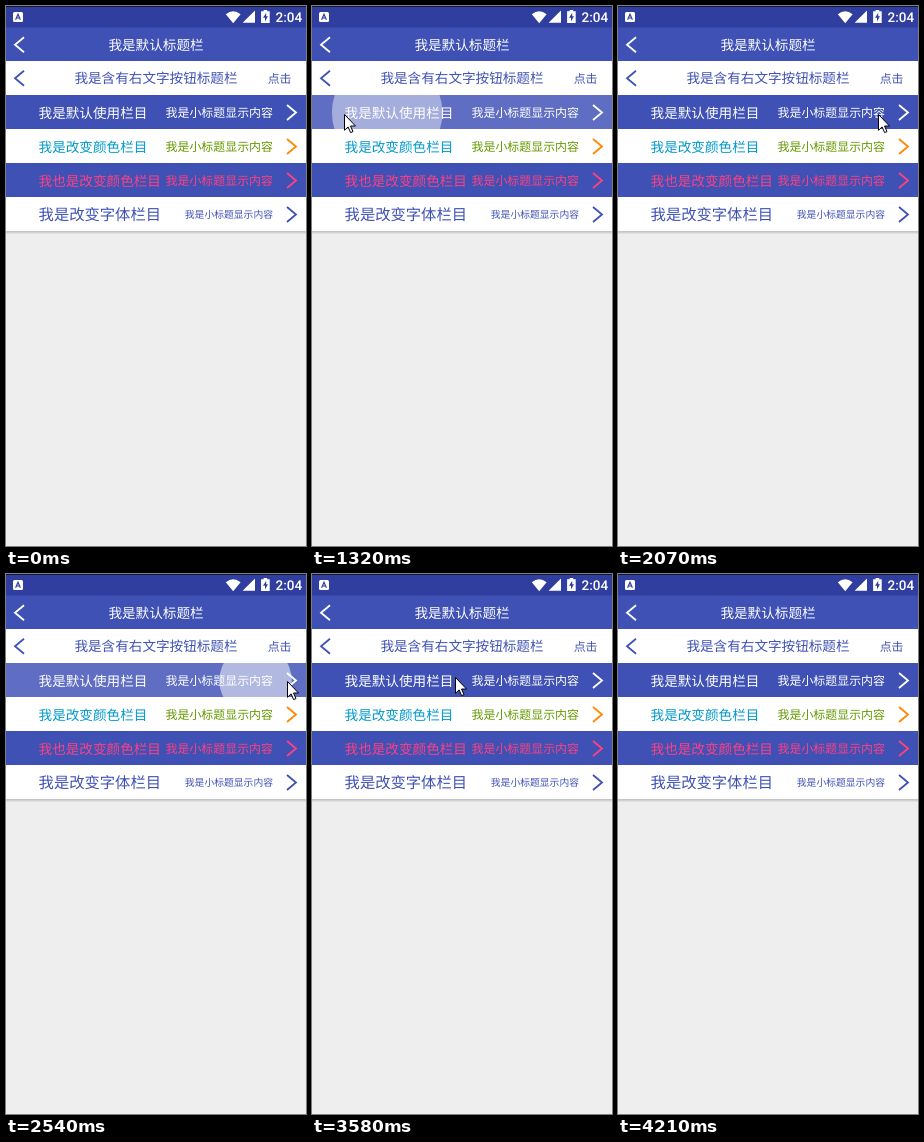
Animation, 300 px wide and 540 px high, one loop 4710 ms. Source, as an HTML page:

```html
<!DOCTYPE html>
<html lang="zh-CN">
<head>
<meta charset="utf-8">
<title>标题栏与栏目</title>
<style>
html, body { margin: 0; width: 100%; height: 100%; overflow: hidden; background: #eee; }
svg { display: block; width: 300px; height: 540px; }
text { font-family: "Noto Sans CJK SC", "Noto Sans CJK", sans-serif; text-rendering: geometricPrecision; }
.clock { font-family: Roboto, sans-serif; font-weight: 500; }
</style>
</head>
<body>
<svg id="stage" viewBox="0 0 300 540">
  <defs>
    <linearGradient id="shade" x1="0" y1="0" x2="0" y2="1">
      <stop offset="0" stop-color="#bdbdbd"/>
      <stop offset="1" stop-color="#eee"/>
    </linearGradient>
    <clipPath id="rowClip"><rect y="89" width="300" height="34"/></clipPath>
  </defs>
  <rect width="300" height="540" fill="#eee"/>
  <rect y="225" width="300" height="3.5" fill="url(#shade)"/>
  <rect width="300" height="22" fill="#303f9f"/>
  <rect width="300" height="1" fill="#14182c"/>
  <g id="bars"></g>
  <g clip-path="url(#rowClip)" fill="#fff">
    <rect id="glow" y="89" width="300" height="34"/>
    <circle id="ripple" cy="106.5"/>
  </g>
  <g id="labels"></g>

  <!-- status bar -->
  <g fill="#fff">
    <rect x="7" y="6" width="10" height="10" rx="1.5"/>
    <path d="M9.6 13.8 12 8.2l2.4 5.6M10.4 12h3.2" fill="none" stroke="#303f9f" stroke-width="1.2"/>
    <path d="M219.8 8.2Q227.2 2.2 234.6 8.2L227.2 17.2Z"/>
    <path d="M249 4.6V16.8H236.6Z"/>
    <path d="M257.6 5.2V4h3.6v1.2h2.5V17h-8.6V5.2Z"/>
    <path d="M260.2 6.8 257 11.8h2v3.6l3-5.2h-1.8Z" fill="#303f9f"/>
    <text class="clock" x="269.6" y="16" font-size="13.5">2:04</text>
  </g>
  <path id="cursor" d="M.5 .5V16.3L4.1 12.9 6.6 18.6 9 17.6 6.5 12H11.5Z" fill="#fff" stroke="#000"/>
</svg>
<script>
const LOOP = 4710;
const BLUE = "#3f51b5", WHITE = "#fff", PINK = "#ff4081";
const $ = id => document.getElementById(id);

function add(parent, tag, attrs, content = "") {
  const node = document.createElementNS("http://www.w3.org/2000/svg", tag);
  for (const key in attrs) node.setAttribute(key, attrs[key]);
  node.textContent = content;
  $(parent).append(node);
}
const bar = (y, fill) => add("bars", "rect", { y, width: 300, height: 34, fill });
const label = (x, mid, size, fill, anchor, content) => add("labels", "text",
  { x, y: mid + size * 0.37, "font-size": size, fill, "text-anchor": anchor }, content);
const chevron = (x, mid, dir, stroke) => add("labels", "path",
  { d: `M${x} ${mid - 7.5}l${9 * dir} 7.5l${-9 * dir} 7.5`, fill: "none", stroke, "stroke-width": 1.8 });

function header(y, back, ink, title) {
  bar(y, back);
  chevron(18, y + 17.2, -1, ink);
  label(150, y + 17.3, 13.6, ink, "middle", title);
}
function row(y, back, ink, subInk, arrowInk, title, size = 13.6, subSize = 11.95) {
  bar(y, back);
  label(32.6, y + 17.6, size, ink, "start", title);
  label(267, y + 17.6, subSize, subInk, "end", "我是小标题显示内容");
  chevron(281, y + 17.5, 1, arrowInk);
}

header(21.5, BLUE, WHITE, "我是默认标题栏");
header(55, WHITE, BLUE, "我是含有右文字按钮标题栏");
label(285.5, 72.5, 11.9, BLUE, "end", "点击");
row(89, BLUE, WHITE, WHITE, WHITE, "我是默认使用栏目");
row(123, WHITE, "#0099cc", "#669900", "#ff8800", "我是改变颜色栏目");
row(157, BLUE, PINK, PINK, PINK, "我也是改变颜色栏目");
row(191, WHITE, BLUE, BLUE, BLUE, "我是改变字体栏目", 15.3, 9.8);

// Pointer stops: time, x, y
const path = [
  [30, 262, 488], [470, 32, 126], [520, 31, 150], [570, 29, 153], [690, 17, 125],
  [800, 22, 94], [880, 31, 108], [980, 31, 108], [1030, 32, 108], [1500, 32, 108],
  [1620, 53, 105], [1639, 53, 105], [1640, 156, 113], [1690, 160, 113],
  [2150, 281, 107], [2640, 281, 107], [2860, 203, 105], [2899, 203, 105],
  [2900, 187, 104], [3090, 121, 103], [3320, 122, 103], [3450, 135, 91],
  [3580, 143, 103], [3840, 142, 103], [3960, 142, 103], [4200, 190, 408]
];
const taps = [
  { x: 32, down: 1120, grow: 1140, up: 1280, end: 1610 },
  { x: 281, down: 2250, grow: 2400, up: 2640, end: 2900 },
  { x: 142, down: 3870, grow: 3880, up: 3960, end: 4210 }
];

const ramp = (t, a, b) => Math.min(1, Math.max(0, (t - a) / (b - a)));
const mix = (a, b, k) => a + (b - a) * k;

function drawCursor(t) {
  const next = path.findIndex(stop => stop[0] > t);
  $("cursor").style.display = next > 0 ? "" : "none";
  if (next < 1) return;
  const [t0, x0, y0] = path[next - 1], [t1, x1, y1] = path[next];
  const k = ramp(t, t0, t1);
  $("cursor").setAttribute("transform",
    `translate(${Math.round(mix(x0, x1, k))} ${Math.round(mix(y0, y1, k))})`);
}

function drawRipple(t) {
  const tap = taps.find(p => t >= p.down && t < p.end);
  const glow = $("glow"), ripple = $("ripple");
  if (!tap) {
    glow.setAttribute("opacity", 0);
    ripple.setAttribute("opacity", 0);
    return;
  }
  const held = ramp(t, tap.grow, Math.min(tap.grow + 140, tap.up));
  const gone = ramp(t, tap.up, tap.end);
  const spread = ramp(gone, 0, 0.75);
  const size = mix(0.24 * held, 1, spread);
  glow.setAttribute("opacity", 0.17 * held * (1 - gone ** 3));
  // the circle drifts to the row's centre as it grows
  ripple.setAttribute("cx", mix(tap.x, 150, size));
  ripple.setAttribute("r", Math.max(12, 151 * size));
  ripple.setAttribute("opacity", 0.52 * (1 - spread));
}

function render(t) {
  drawCursor(t);
  drawRipple(t);
}

const start = performance.now();
function tick() {
  render((performance.now() - start) % LOOP);
  requestAnimationFrame(tick);
}
tick();
</script>
</body>
</html>
```
